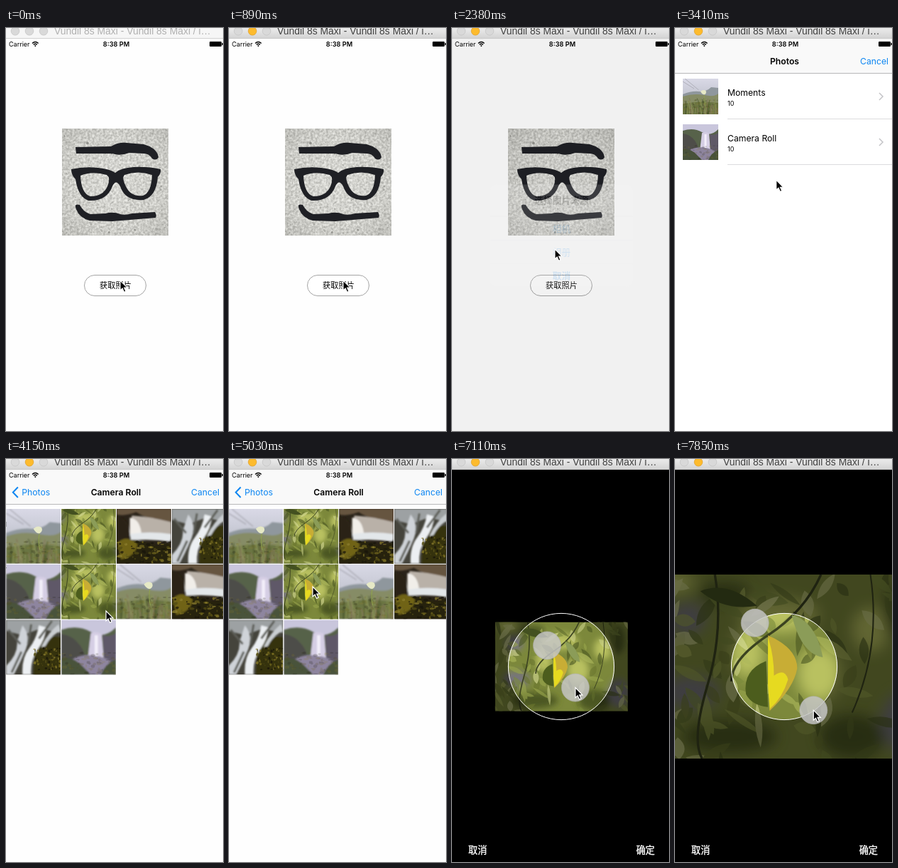
An HTML page that plays this animation: 306x565 px, repeating every 7.99 s.

```html
<!DOCTYPE html>
<html lang="zh-CN">
<head>
<meta charset="utf-8">
<title>Photo picker</title>
<style>
  html, body { margin: 0; width: 100%; height: 100%; overflow: hidden; background: #fff; }
  #stage { display: block; font-family: Inter, "Noto Sans CJK SC", "Noto Sans CJK", sans-serif; }
  .mid { text-anchor: middle; }
  .blue { fill: #0d86f2; }
  .bold { font-weight: 600; }
  .nav { font-size: 12.2px; }
  .title { font: 13.9px "Liberation Sans", sans-serif; }
</style>
</head>
<body>
<svg id="stage" width="306" height="565" viewBox="0 0 306 565">
  <defs>
    <filter id="soft"><feGaussianBlur stdDeviation="1.3"/></filter>
    <filter id="haze" x="-50%" y="-50%" width="200%" height="200%"><feGaussianBlur stdDeviation="4"/></filter>
    <filter id="rough" x="0" y="0" width="1" height="1" color-interpolation-filters="sRGB">
      <feTurbulence type="fractalNoise" baseFrequency=".32" numOctaves="3" seed="4"/>
      <feColorMatrix values=".75 0 0 0 .42  .75 0 0 0 .42  .75 0 0 0 .4  0 0 0 0 1"/>
    </filter>
    <linearGradient id="bar" x2="0" y2="1">
      <stop stop-color="#ebebeb"/><stop offset="1" stop-color="#d2d2d2"/>
    </linearGradient>
    <radialGradient id="shade" r=".75">
      <stop stop-color="#e4e4e0"/><stop offset=".6" stop-color="#d0d0cb"/><stop offset="1" stop-color="#a8a8a3"/>
    </radialGradient>
    <linearGradient id="sky" x2="0" y2="1">
      <stop stop-color="#d9d9e6"/><stop offset=".5" stop-color="#c3c5d0"/>
    </linearGradient>
    <clipPath id="stoneClip"><rect x="79" y="141" width="150" height="150"/></clipPath>

    <g id="leaf">
      <rect width="150" height="112" fill="#7c883b"/>
      <g filter="url(#haze)">
        <g fill="#b9c160">
          <ellipse cx="72" cy="22" rx="22" ry="9"/>
          <ellipse cx="55" cy="42" rx="9" ry="14"/>
          <ellipse cx="94" cy="54" rx="12" ry="15"/>
          <ellipse cx="14" cy="4" rx="12" ry="6"/>
          <ellipse cx="122" cy="30" rx="10" ry="12"/>
        </g>
        <g fill="#77747d">
          <ellipse cx="22" cy="24" rx="10" ry="9"/>
          <ellipse cx="24" cy="64" rx="15" ry="9"/>
          <ellipse cx="140" cy="80" rx="12" ry="16"/>
        </g>
        <g fill="#4b5722">
          <ellipse cx="42" cy="10" rx="14" ry="6"/>
          <ellipse cx="45" cy="88" rx="26" ry="9"/>
          <ellipse cx="112" cy="88" rx="18" ry="12"/>
          <ellipse cx="138" cy="20" rx="9" ry="16"/>
        </g>
      </g>
      <g id="foliage" opacity=".62"></g>
      <g fill="none" stroke="#3b4220" stroke-width="1.3">
        <path d="M95 0Q86 20 66 33T46 58M37 0Q42 30 33 60T30 100"/>
        <path d="M122 0Q128 40 112 75" stroke-width=".8"/>
      </g>
      <path d="M79 22Q92 25 96 45Q84 43 79 22Z" fill="#8b9c58"/>
      <path d="M29 9Q44 3 60 17Q42 20 29 9Z" fill="#435020"/>
      <path d="M65 47Q52 52 54 65Q57 71 66 72Z" fill="#4c5d1d"/>
      <path d="M66 33Q82 40 82 51Q80 62 67 74Q69 55 66 33Z" fill="#c8ad35"/>
      <path d="M66 34Q72 52 67 74L66 60ZM68 56Q75 50 77 57Q74 67 67 73Z" fill="#e6da20"/>
    </g>

    <g id="flower">
      <rect width="100" height="100" fill="url(#sky)"/>
      <g filter="url(#soft)">
        <path d="M0 44Q25 34 45 36T80 24L100 26V100H0Z" fill="#8f979d"/>
        <path d="M0 50Q30 40 60 46T100 42V100H0Z" fill="#868c66"/>
        <path d="M0 72Q40 60 100 68V100H0Z" fill="#6b7442"/>
        <path d="M6 0L45 32M0 8L32 28" stroke="#aeaeb8" stroke-width="2"/>
        <g id="grass" fill="none" stroke-width="1.6"></g>
      </g>
      <use href="#mottle" opacity=".3"/>
      <path d="M50 36Q58 29 65 34Q68 41 61 45Q54 44 50 36Z" fill="#e6e9c6"/>
      <path d="M61 45Q58 60 62 75" stroke="#8fa04f" stroke-width="1.5" fill="none"/>
    </g>

    <g id="rocks">
      <rect width="100" height="100" fill="#2a2319"/>
      <g filter="url(#soft)">
        <path d="M0 0H100V24Q60 22 36 6Q15 14 0 10Z" fill="#66543f"/>
        <path d="M28 12Q60 14 100 24V52Q70 56 36 50Q22 40 28 12Z" fill="#b9b1a8"/>
        <path d="M24 16Q44 18 46 50L24 48Z" fill="#f1eee9"/>
        <path d="M24 46Q60 40 100 46V60Q60 54 26 58Z" fill="#e3e7ea"/>
        <path d="M0 14Q20 14 24 46L20 66H0Z" fill="#2b2413"/>
        <path d="M0 60Q30 52 58 62T100 56V100H0Z" fill="#28220e"/>
        <path d="M2 62Q18 46 38 64Q36 86 8 92Z" fill="#6f6418"/>
      </g>
      <use href="#mottle"/>
    </g>

    <g id="stream">
      <rect width="100" height="100" fill="#45443c"/>
      <g filter="url(#soft)">
        <path d="M0 0H100V24L62 16L30 28L0 20Z" fill="#9da1a3"/>
        <path d="M52 44Q74 26 100 32V100H50Z" fill="#35330f"/>
        <path d="M30 10Q46 30 36 54T14 100H0V84Q22 62 20 40Z" fill="#cfd3d8"/>
        <path d="M60 10Q56 34 42 52T30 100H46Q44 74 58 54T74 14Z" fill="#eceff2"/>
        <path d="M96 8Q76 24 64 50L72 48Q82 28 100 20Z" fill="#c9cdd1"/>
        <path d="M4 18L26 44M46 8L40 44M84 2L60 34M10 96L28 58" stroke="#5d5e58" stroke-width="4"/>
      </g>
      <use href="#mottle" transform="translate(50 -8) scale(.5 1)"/>
    </g>

    <g id="falls">
      <rect width="100" height="100" fill="#c9c6dc"/>
      <g filter="url(#soft)">
        <path d="M0 18Q30 8 54 22T100 14V100H0Z" fill="#57624a"/>
        <path d="M0 26Q20 28 34 46T46 100H0Z" fill="#4e4d49"/>
        <path d="M54 24Q66 20 74 26L78 74H48Z" fill="#d5cee4"/>
        <path d="M76 28Q90 32 100 24V78H78Z" fill="#5f5967"/>
        <path d="M20 72Q50 56 90 74L80 100H30Z" fill="#8e859f"/>
        <path d="M0 70Q20 66 38 84L54 100H0ZM100 72Q80 80 72 100H100Z" fill="#48523a"/>
        <path d="M64 28V66" stroke="#f3effa" stroke-width="6"/>
      </g>
      <use href="#mottle" opacity=".25"/>
    </g>
    <g id="mottle"></g>

    <path id="arrow" d="M0 0V14L3.2 11.1L5.6 16.4L8 15.3L5.7 10.2H10Z"/>
    <path id="chevron" d="M0 0L5 5L0 10" fill="none" stroke="#c4c4c8" stroke-width="1.5"/>
  </defs>

  <rect width="306" height="565" fill="#fefefe"/>

  <g clip-path="url(#stoneClip)">
    <rect x="79" y="141" width="150" height="150" filter="url(#rough)"/>
    <rect x="79" y="141" width="150" height="150" fill="url(#shade)" opacity=".5"/>
    <g id="specks"></g>
    <g fill="#1f2025">
      <path d="M98 167L148 166Q158 160 170 161L194 163Q213 168 215 181Q212 187 206 183Q202 176 194 176L174 175Q160 180 150 176L99 176Z"/>
      <path fill-rule="evenodd" d="M92 198Q110 194 130 196Q148 198 154 203Q162 196 180 195Q200 194 218 198Q219 204 214 209Q212 236 194 241Q168 243 161 222Q155 211 150 222Q142 243 117 242Q102 238 98 212Q92 206 92 198ZM105 207Q122 200 142 206Q148 210 143 222Q137 236 119 236Q106 232 105 207ZM167 206Q186 199 206 206Q205 231 193 235Q176 237 169 222Q163 210 167 206Z"/>
      <path d="M98 251Q97 246 104 248Q109 258 119 261L140 260Q152 257 161 261Q168 263 178 260L210 258Q213 262 211 266L150 271L118 270Q102 266 98 251Z"/>
    </g>
  </g>
  <rect x="110.5" y="346.5" width="87" height="29" rx="14.5" fill="#fff" stroke="#a4a4a4"/>
  <text class="mid" x="154.5" y="365" font-size="11.2">获取照片</text>

  <rect id="dim" y="15" width="306" height="550"/>
  <g id="alert" font-size="13">
    <rect x="51.5" y="218" width="205.5" height="146" rx="9.5" fill="#f8f8f8" fill-opacity=".965"/>
    <rect id="pressed" x="51.5" y="297.5" width="205.5" height="33.5" fill="#e2e2e2"/>
    <path d="M51.5 263.5H257M51.5 297.5H257M51.5 331.5H257" stroke="#dedee0" stroke-width=".8"/>
    <g class="mid">
      <text class="bold" x="154.5" y="245.5">选择图片来源</text>
      <g class="blue">
        <text x="154.5" y="286">相机</text>
        <text x="154.5" y="319.5">相册</text>
        <text class="bold" x="154.5" y="353">取消</text>
      </g>
    </g>
  </g>

  <g id="picker">
    <rect y="15" width="306" height="552" fill="#fff"/>
    <g id="albums">
      <rect id="row" y="128" width="306" height="64" fill="#d9d9d9"/>
      <g id="list"></g>
    </g>
    <g id="roll">
      <rect y="64" width="309" height="503" fill="#fefefe"/>
      <g id="grid"></g>
    </g>
    <rect y="15" width="306" height="48.5" fill="#f9f9f9"/>
    <path d="M0 63.5H306" stroke="#b8b8ba"/>
    <text id="rootTitle" class="nav bold mid" x="154.5" y="51">Photos</text>
    <g id="back" class="nav blue">
      <path d="M16.5 39.5L9.5 46.8L16.5 54" fill="none" stroke="#0d86f2" stroke-width="2"/>
      <text x="22" y="51">Photos</text>
    </g>
    <text id="rollTitle" class="nav bold mid" x="154.5" y="51">Camera Roll</text>
    <text class="nav blue" x="301" y="51" text-anchor="end">Cancel</text>
  </g>

  <g id="status">
    <text x="4" y="26" font-size="9">Carrier</text>
    <g fill="none" stroke="#000" stroke-width="1.4">
      <path d="M37 21.4Q41.3 17.6 45.6 21.4M38.8 23.4Q41.3 21.2 43.8 23.4"/>
    </g>
    <circle cx="41.3" cy="25" r="1"/>
    <text class="bold mid" x="155.5" y="26" font-size="9.2">8:38 PM</text>
    <rect x="287" y="19" width="17" height="7" rx="1.2"/>
    <rect x="304.6" y="21" width="1.4" height="3"/>
  </g>

  <g id="crop">
    <rect y="15" width="306" height="560"/>
    <g id="photo">
      <svg x="-75" y="-50" width="150" height="100" viewBox="0 0 150 100"><use href="#leaf"/></svg>
    </g>
    <path fill-rule="evenodd" fill-opacity=".48" d="M0 15H306V565H0ZM79 291A75 75 0 0 0 229 291A75 75 0 0 0 79 291Z"/>
    <circle cx="154" cy="291" r="74.6" fill="none" stroke="#fff"/>
    <g fill="#fff" stroke="#fff" stroke-width=".35" font-size="13.2">
      <text x="23" y="553">取消</text>
      <text x="286" y="553" text-anchor="end">确定</text>
    </g>
  </g>

  <rect id="titleBar" width="306" height="15"/>
  <path d="M0 14.6H306" stroke="#c6c6c6" stroke-width=".8"/>
  <g stroke="#c4c4c4" stroke-width=".8" fill="#d9d9d9">
    <circle cx="13" cy="4.3" r="5.8"/>
    <circle id="amber" cx="33" cy="4.3" r="5.8"/>
    <circle cx="53" cy="4.3" r="5.8"/>
  </g>
  <text id="caption" class="title" x="68" y="9.3">Vundil 8s Maxi - Vundil 8s Maxi / i…</text>

  <g id="touches" fill="#c6c6c6" fill-opacity=".84" stroke="#b0b0b0" stroke-opacity=".6">
    <circle id="touchA" r="19.5"/><circle id="touchB" r="19.5"/>
  </g>
  <use id="cursor" href="#arrow" stroke="#fff" stroke-width="1.2"/>
</svg>

<script>
const $ = id => document.getElementById(id);
const set = (id, attrs) => {
  for (const k in attrs) $(id).setAttribute(k, attrs[k]);
};
const move = (id, x, y) => set(id, { transform: `translate(${x} ${y})` });
const show = (id, on) => set(id, { visibility: on ? 'visible' : 'hidden' });

function seeded(seed) {
  return (a = 0, b = 1) => {
    seed = (seed * 16807) % 2147483647;
    return a + (b - a) * seed / 2147483647;
  };
}
const repeat = (n, make) => Array.from({ length: n }, (_, i) => make(i)).join('');
const pick = (rnd, list) => list[Math.floor(rnd() * list.length)];

function drawTextures() {
  let rnd = seeded(71);
  $('specks').innerHTML = repeat(260, () => {
    const r = rnd() ** 5 * 1.5 + .4;
    return `<circle cx="${rnd(79, 229)}" cy="${rnd(141, 291)}" r="${r}" fill="${pick(rnd, ['#6a6a66', '#93938e', '#eeeeea'])}" opacity=".6"/>`;
  });
  rnd = seeded(29);
  const greens = ['#4b5822', '#5f6d2c', '#7b8b3c', '#98a54c', '#adb85c', '#c9cf86', '#d3d994', '#6b762f'];
  $('foliage').innerHTML = repeat(120, () => {
    const len = rnd(9, 25), w = rnd(3, 7);
    return `<path d="M0 0Q${len / 2} ${-w} ${len} 0Q${len / 2} ${w} 0 0Z" fill="${pick(rnd, greens)}" transform="translate(${rnd(-8, 150)} ${rnd(-10, 104)}) rotate(${rnd(5, 150)})"/>`;
  });
  $('grass').innerHTML = repeat(45, () => {
    const x = rnd(0, 100), y = rnd(54, 84);
    return `<path d="M${x} 100Q${x + 2} ${y + 10} ${x + rnd(-7, 7)} ${y}" stroke="${pick(rnd, ['#848f50', '#4f5c30', '#85755a', '#929a62'])}"/>`;
  });
  $('mottle').innerHTML = repeat(90, () =>
    `<ellipse cx="${rnd(0, 100)}" cy="${rnd(60, 100)}" rx="${rnd(1, 5)}" ry="${rnd(.8, 3)}" fill="${pick(rnd, ['#756a1f', '#554d14', '#17150a', '#8f8130'])}" opacity=".7"/>`);
}

const thumb = (name, x, y, size) =>
  `<svg x="${x}" y="${y}" width="${size}" height="${size}" viewBox="${name === 'leaf' ? '27 7 100 100' : '0 0 100 100'}"><use href="#${name}"/></svg>`;

function drawPicker() {
  const roll = 'flower leaf rocks stream falls leaf flower rocks stream falls'.split(' ');
  $('grid').innerHTML = roll.map((name, i) =>
    thumb(name, i % 4 * 77.9 - .6, 70 + Math.floor(i / 4) * 77.8, 76.8)).join('');
  $('list').innerHTML = [['Moments', 'flower'], ['Camera Roll', 'falls']].map(([label, name], i) => {
    const y = 64 + i * 64;
    return thumb(name, 11, y + 7, 50) +
      `<text x="74" y="${y + 31}" font-size="12.2">${label}</text>
       <text x="74" y="${y + 45}" font-size="9">10</text>
       <use href="#chevron" x="288" y="${y + 27}"/>
       <path d="M74 ${y + 63.5}H306" stroke="#d4d4d6" stroke-width=".8"/>`;
  }).join('');
}

// The screen only refreshes on these ticks: [first, last, count]
const LOOP = 7990;
const ticks = [0];
for (const [a, b, n] of [[890, 1790, 7], [1940, 2960, 8], [3110, 4150, 8], [4290, 4730, 4], [5030, 5030, 1], [5330, 6210, 7], [6810, 7850, 8]])
  for (let i = 0; i < n; i++) ticks.push(n > 1 ? Math.floor((a + (b - a) * i / (n - 1)) / 10) * 10 : a);

function track(keys, t) {
  const i = keys.findIndex(k => k[0] > t);
  if (i < 0) return keys[keys.length - 1].slice(1);
  if (i === 0) return keys[0].slice(1);
  const a = keys[i - 1], b = keys[i], p = (t - a[0]) / (b[0] - a[0]);
  return a.slice(1).map((v, j) => v + (b[j + 1] - v) * p);
}

// Share of the way still to go for a critically damped transition
function left(t, start) {
  const s = Math.max(0, t - start) * .018;
  return (1 + s) * Math.exp(-s);
}

const pointer = [
  [1040, 161, 354], [1190, 161, 341], [1640, 145, 310], [2960, 145, 310],
  [3550, 142, 180], [3850, 142, 180], [4150, 141, 213], [4730, 118, 179],
  [5180, 118, 179], [5620, 183, 352], [6210, 170, 315]
];
// time, dim, alert opacity, alert scale
const alertKeys = [
  [890, 0, 0, 1.15], [1040, .13, .4, 1.1], [1190, .31, 1, 1], [1340, .4, 1, .98],
  [1940, .4, 1, .98], [2090, .3, .75, .98], [2230, .14, .36, .98], [2380, .046, .12, .98], [2530, 0, 0, .98]
];
const zoomKeys = [[6810, 1], [6960, 1.08], [7110, 1.26], [7850, 2.58]];

function render(t) {
  const active = t >= 890;
  set('titleBar', { fill: active ? 'url(#bar)' : '#f6f6f6' });
  set('amber', { fill: active ? '#fdbb2d' : '#d9d9d9', stroke: active ? '#e0a02a' : '#c4c4c4' });
  set('caption', { fill: active ? '#404040' : '#b0b0b0' });

  const [dim, alpha, scale] = track(alertKeys, t);
  set('dim', { opacity: dim });
  set('alert', { opacity: alpha, transform: `translate(154.5 291) scale(${scale}) translate(-154.5 -291)` });
  show('pressed', t >= 1790 && t < 2230);

  show('picker', t >= 2530);
  move('picker', 0, 550 * left(t, 2440));
  const rem = left(t, 3700);
  move('roll', 309 * rem, 0);
  move('albums', -93 * (1 - rem), 0);
  show('row', t >= 3700);
  move('rootTitle', -112 * (1 - rem), 0);
  set('rootTitle', { opacity: rem });
  move('back', 112 * rem, 0);
  set('back', { opacity: 1 - rem });
  move('rollTitle', 150 * rem, 0);
  set('rollTitle', { opacity: 1 - rem });

  show('crop', t >= 5330);
  move('crop', 0, Math.round(550 * left(t, 5180)));
  const [zoom] = track(zoomKeys, t);
  set('photo', { transform: `translate(154.3 291) scale(${zoom})` });

  const pinching = t >= 6810, dx = 16 * zoom, dy = 23.7 * zoom;
  show('touches', pinching);
  move('touchA', 154 - dx, 291 - dy);
  move('touchB', 154 + dx, 291 + dy);
  const [x, y] = pinching ? [154 + dx, 291 + dy] : track(pointer, t);
  move('cursor', x, y);
}

drawTextures();
drawPicker();
let shown = -1;
const began = performance.now();
function tick() {
  const now = (performance.now() - began) % LOOP;
  const t = ticks.filter(k => k <= now).pop();
  if (t !== shown) render(shown = t);
  requestAnimationFrame(tick);
}
tick();
</script>
</body>
</html>
```
